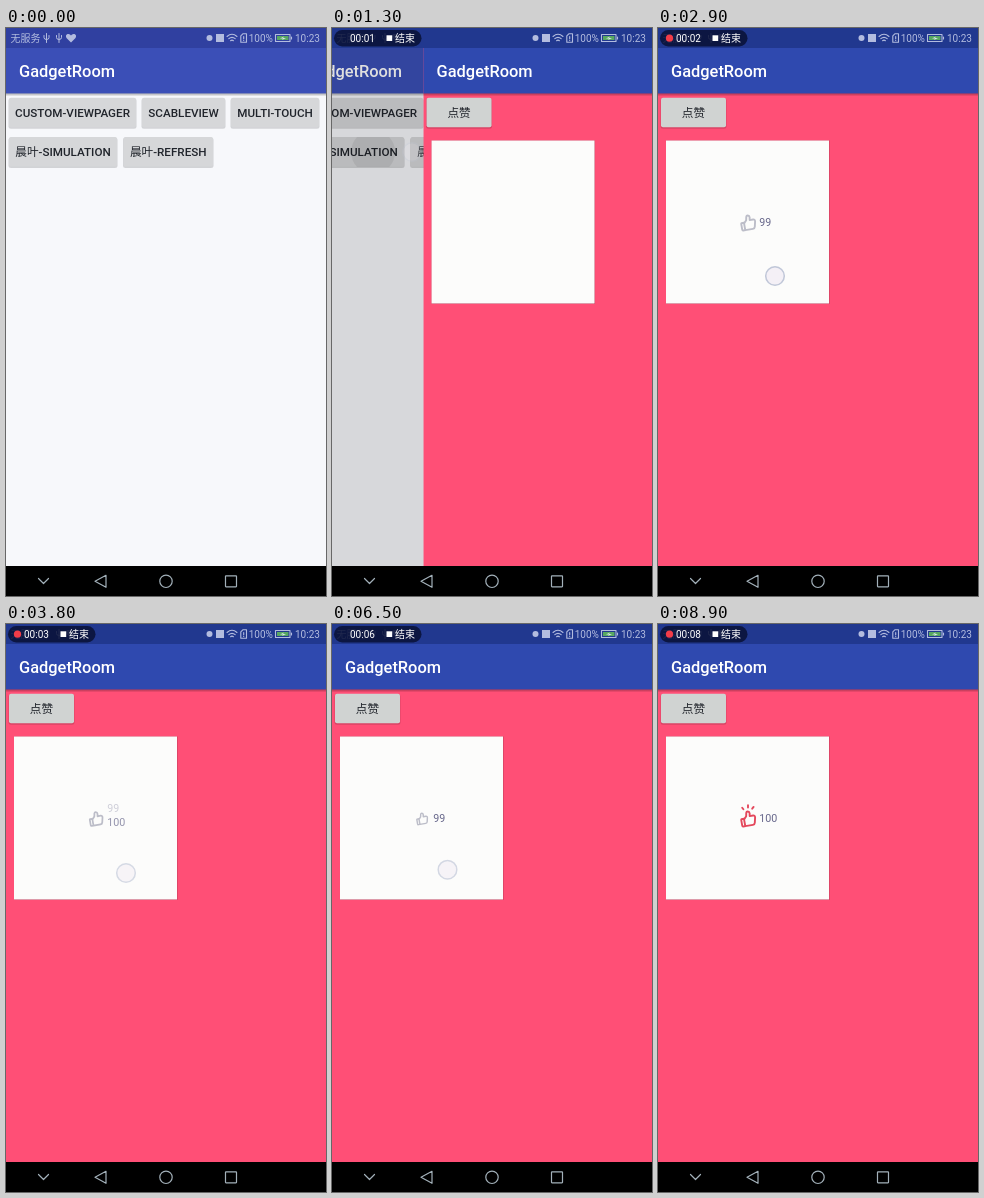
These frames come from a looping animation (320 by 568 pixels, 9 s). An HTML page:

```html
<!DOCTYPE html>
<html lang="zh">
<head>
<meta charset="utf-8">
<title>Like button demo</title>
<style>
  html, body { margin: 0; width: 100%; height: 100%; overflow: hidden; background: #000; }
  svg { display: block; width: 100vw; height: 100vh; font-family: Roboto, "Noto Sans CJK SC", "Noto Sans CJK", sans-serif; }
  .line { fill: none; stroke-linecap: round; stroke-linejoin: round; }
  .title { font-size: 16.4px; font-weight: 500; fill: #fff; }
  .label { font-size: 11.67px; font-weight: 500; fill: #20242b; text-anchor: middle; }
  .status { font-size: 10px; fill: #b3bcdf; }
  .count { font-size: 10.7px; fill: #66668a; }
</style>
</head>
<body>
<svg viewBox="0 0 320 568">
  <defs>
    <clipPath id="pressedClip"><rect x="3" y="109" width="108" height="30" rx="2"/></clipPath>
    <linearGradient id="shade" x2="0" y2="1">
      <stop stop-opacity=".3"/><stop offset="1" stop-opacity="0"/>
    </linearGradient>
    <path id="usb" d="M0 5V-4M-2.5-2V0Q-2.5 2 0 2Q2.5 2 2.5 0V-2"/>
  </defs>

  <g id="menuPage">
    <rect y="20" width="320" height="518" fill="#f7f8fb"/>
    <rect y="20" width="320" height="45.5" fill="#3b4fb7"/>
    <rect y="65.5" width="320" height="3" fill="url(#shade)"/>
    <text class="title" x="13" y="49">GadgetRoom</text>
    <g id="menuButtons"></g>
    <circle id="ripple" cx="80" cy="124" fill="#000" clip-path="url(#pressedClip)"/>
  </g>
  <rect id="dim" y="20" width="320" height="518"/>

  <g id="likePage">
    <rect y="20" width="320" height="518" fill="#ff4f76"/>
    <rect y="20" width="320" height="45.5" fill="#2f49af"/>
    <rect y="65.5" width="320" height="3" fill="url(#shade)"/>
    <text class="title" x="13" y="49">GadgetRoom</text>
    <g id="likeButton"></g>
    <rect x="8" y="112.5" width="163.5" height="163.5" fill="#000" opacity=".25"/>
    <rect x="8" y="112.5" width="163" height="163" fill="#fcfcfb"/>
    <g id="likeView">
      <g id="thumb" class="line" stroke-width="1.9">
        <g transform="rotate(-10)">
          <path d="M-6.6-.5H-4V7H-6Q-6.9 7-6.9 6V0ZM-4 .2L-1.4-2.6L-.7-6Q-.3-7.4 1-7.1Q2.6-6.7 2.5-4.8L2.1-2.2H5.6Q7.5-2 7.2 0L6 5.2Q5.6 7 3.8 7H-4"/>
        </g>
      </g>
      <g id="rays" class="line" stroke="#e4485c" stroke-width="1.9">
        <path d="M-5.8-3.8L-4.6-2.2M0-6.2V-4M5.6-4.6L4.2-2.8"/>
      </g>
      <text id="count99" class="count" x="101.3">99</text>
      <text id="count100" class="count" x="101.3">100</text>
    </g>
  </g>

  <circle id="touch" r="9.3" fill="#f2edf4" fill-opacity=".85" stroke="#c0c7d8" stroke-width="1.5"/>

  <rect id="statusBar" width="320" height="20"/>
  <g class="status">
    <text x="4.5" y="13.7">无服务</text>
    <g class="line" stroke="#b3bcdf">
      <use href="#usb" x="40.5" y="9.5"/><use href="#usb" x="53" y="9.5"/>
    </g>
    <path d="M65 14.5L60.5 10Q59 7 61.5 6Q64 5.5 65 7.5Q66 5.5 68.5 6Q71 7 69.5 10Z"/>
    <circle cx="203.5" cy="10" r="3"/>
    <rect x="210" y="6" width="8" height="8"/>
    <g class="line" stroke="#b3bcdf" stroke-width="1.1">
      <path d="M221 8.5Q226 4 231 8.5M222.8 10.7Q226 8 229.2 10.7M224.6 12.7Q226 11.6 227.4 12.7"/>
      <path d="M236.8 5.8H240.5V14.2H234.8V7.8ZM237.7 8.5V10.7M237.7 12.3V12.4"/>
      <rect x="269.5" y="6.5" width="14.5" height="7"/>
      <path d="M285.5 9V11"/>
    </g>
    <text x="242.7" y="13.6">100%</text>
    <rect x="271" y="8" width="11.5" height="4" fill="#58a862"/>
    <path d="M274 10.5L278 8.5L277 10H280L276 12L277 10.5Z" fill="#dce5ea"/>
    <text x="289" y="13.6">10:23</text>
  </g>

  <g id="recorder">
    <rect x="2" y="2" width="87.5" height="16.5" rx="8.2" fill="#0a1238" fill-opacity=".87"/>
    <circle id="recDot" cx="11.5" cy="10.2" r="3.6" fill="#f23c48"/>
    <text id="clock" x="18" y="13.7" font-size="10" fill="#fff"></text>
    <rect x="54.5" y="7.3" width="5.7" height="5.7" fill="#fff"/>
    <text x="63" y="13.8" font-size="10" fill="#fff">结束</text>
  </g>

  <rect y="538" width="320" height="30"/>
  <g class="line" stroke="#a3b1ba" stroke-width="1.2">
    <path d="M32.5 550.5L37.5 555.5L42.5 550.5M89 553.3L100 547.3V559.3Z"/>
    <circle cx="160" cy="553.3" r="6.2"/>
    <rect x="219.5" y="547.8" width="11" height="11" rx=".5"/>
  </g>
</svg>

<script>
const LOOP = 9000, STEP = 100;
const SLIDE = { start: 1100, length: 430 };
const REC_START = 200, VIEW_SHOWN = 2300;

// Release time and place of every tap; the box taps alternate like and unlike.
const OPEN_TAPS = [{ at: 1100, x: 80, y: 124 }, { at: 2150, x: 65, y: 88 }];
const LIKE_TAPS = [
  { at: 2920, x: 117, y: 248 },
  { at: 3710, x: 120, y: 249 },
  { at: 4620, x: 117, y: 249 },
  { at: 5380, x: 115.5, y: 249.7 },
  { at: 6420, x: 115.5, y: 245.7 },
  { at: 7320, x: 116, y: 247 },
  { at: 8220, x: 116, y: 247 }
];

const el = Object.fromEntries([...document.querySelectorAll("[id]")].map(n => [n.id, n]));
const clamp = v => Math.min(1, Math.max(0, v));
const progress = (t, start, length) => clamp((t - start) / length);
const set = (node, attrs) => {
  for (const key in attrs) node.setAttribute(key, attrs[key]);
};

function button(x, y, width, label, fill = "#d6d7d9") {
  return `<rect x="${x - .5}" y="${y + .5}" width="${width + 1}" height="30.5" rx="2.5" opacity=".15"/>
    <rect x="${x}" y="${y}" width="${width}" height="29.5" rx="2" fill="${fill}"/>
    <text class="label" x="${x + width / 2}" y="${y + 19.4}">${label}</text>`;
}

el.menuButtons.innerHTML =
  button(3, 69.7, 127, "CUSTOM-VIEWPAGER") +
  button(136, 69.7, 83, "SCABLEVIEW") +
  button(225, 69.7, 88, "MULTI-TOUCH") +
  button(3, 109, 108, "晨叶-SIMULATION") +
  button(117.5, 109, 89.5, "晨叶-REFRESH");
el.likeButton.innerHTML = button(3, 69.7, 65, "点赞", "#d0d3d2");

function drawPages(t) {
  const p = 1 - (1 - progress(t, SLIDE.start, SLIDE.length)) ** 2;
  set(el.menuPage, { transform: `translate(${-54.5 * p})` });
  set(el.likePage, { transform: `translate(${320 * (1 - p)})` });
  set(el.dim, { opacity: .18 * p });
  set(el.ripple, { r: 8 + 14 * progress(t, 1000, 300), opacity: t < 1000 ? 0 : .07 });
  set(el.statusBar, { fill: t < 1000 ? "#3040a0" : "#21388f" });
}

function drawRecorder(t) {
  const elapsed = Math.max(0, t - REC_START);
  set(el.recorder, { opacity: progress(t, 0, 300) });
  set(el.recDot, { opacity: elapsed % 1000 < 500 ? 0 : 1 });
  el.clock.textContent = "00:0" + Math.floor(elapsed / 1000);
}

function drawTouch(t) {
  const tap = [...OPEN_TAPS, ...LIKE_TAPS].find(tap => t >= tap.at - 150 && t < tap.at + 250);
  set(el.touch, tap
    ? { cx: tap.x, cy: tap.y, opacity: 1 - progress(t, tap.at, 250) }
    : { opacity: 0 });
}

function drawCount(node, offset) {
  set(node, { y: 197.9 + 14.5 * offset, opacity: 1 - Math.abs(offset) });
}

function drawLike(t) {
  set(el.likeView, { opacity: t < VIEW_SHOWN ? 0 : 1 });
  const index = LIKE_TAPS.filter(tap => tap.at <= t).length - 1;
  const since = index < 0 ? Infinity : t - LIKE_TAPS[index].at;
  const liking = index >= 0 && index % 2 === 0;
  const red = liking && since >= 100;
  const turn = progress(since, liking ? 100 : 0, 300);
  const value = liking ? turn : 1 - turn;

  let scale = 1 - .1 * Math.sin(Math.PI * turn);
  if (liking) {
    const grow = progress(since, 100, 200);
    scale = red ? .7 + .3 * grow + .15 * Math.sin(Math.PI * grow) : 1 - .003 * since;
  }
  set(el.thumb, {
    transform: `translate(90 194.6) scale(${scale})`,
    stroke: red ? "#e4485c" : "#bcbdc8"
  });
  set(el.rays, {
    transform: `translate(90 187.5) scale(${red ? progress(since, 100, 200) : 0})`
  });
  drawCount(el.count99, -value);
  drawCount(el.count100, 1 - value);
}

function draw() {
  const t = Math.floor(performance.now() % LOOP / STEP) * STEP;
  drawPages(t);
  drawRecorder(t);
  drawTouch(t);
  drawLike(t);
  requestAnimationFrame(draw);
}
draw();
</script>
</body>
</html>
```
